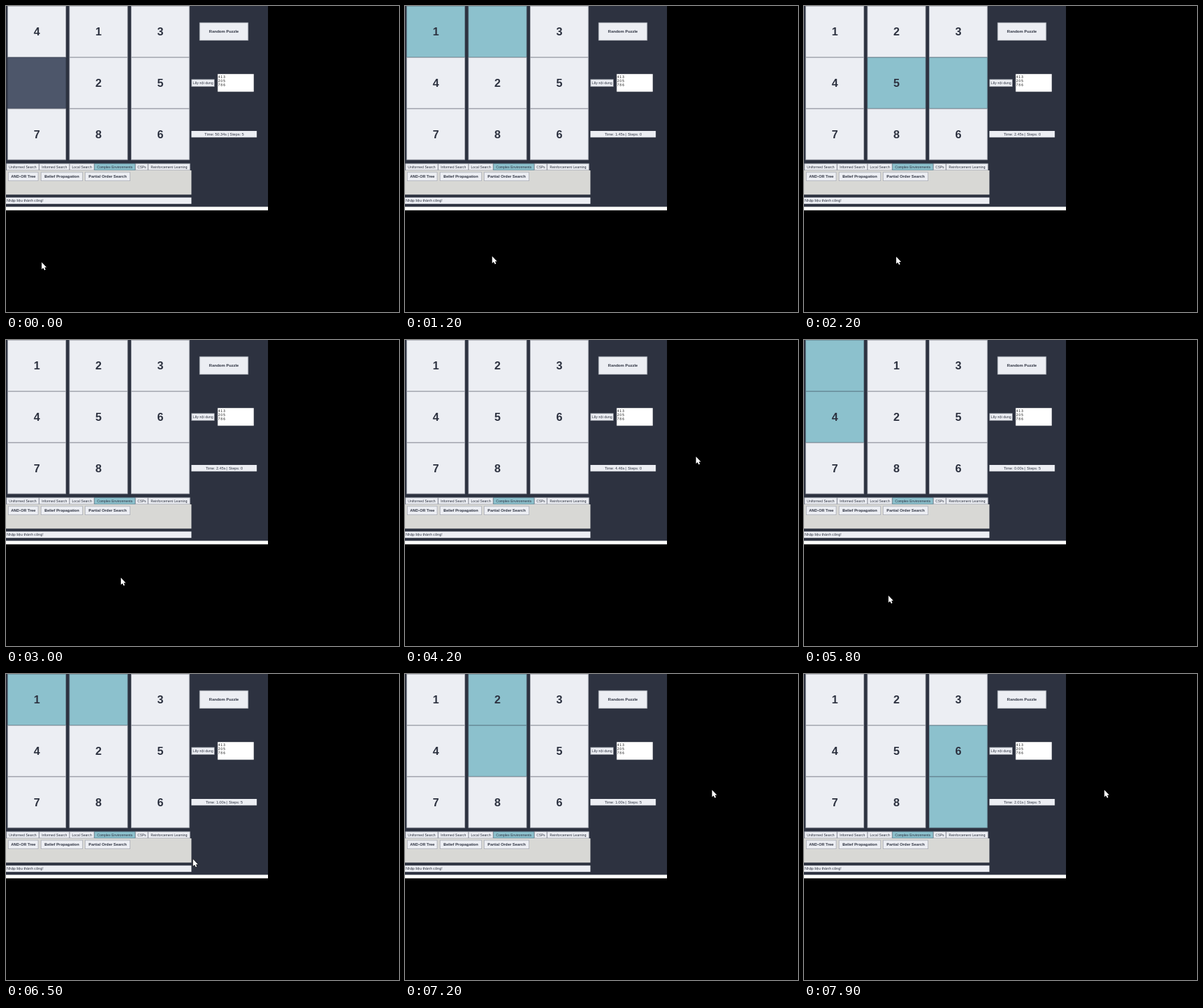
An HTML page with a canvas for the animation above (8 s loop, 588 by 458 pixels).

```html
<!DOCTYPE html>
<html lang="vi">
<head>
<meta charset="utf-8">
<style>
html, body { margin: 0; width: 100%; height: 100%; overflow: hidden; background: #000; }
canvas { display: block; }
</style>
</head>
<body>
<canvas id="stage" width="588" height="458"></canvas>
<script>
const ctx = document.getElementById('stage').getContext('2d');
const LOOP = 8000, STEP = 525, RESET = 4450, RESTART = 5275;
const INK = '#2d3240', LIGHT = '#eceef3', ACCENT = '#8cc1cd', EDGE = 'rgba(45, 50, 64, 0.35)';
const start = [4, 1, 3, 0, 2, 5, 7, 8, 6];
const blankPath = [3, 0, 1, 4, 5, 8];
const tabs = [
  ['Uniformed Search', 0.5, 49.5], ['Informed Search', 49.5, 95], ['Local Search', 95, 132],
  ['Complex Environments', 132, 193.5], ['CSPs', 193.5, 212.5], ['Reinforcement Learning', 212.5, 275.5]
];
// time, x, y of the pointer tip
const pointerKeys = [
  [0, 53, 383], [300, 53, 383], [1100, 130, 374], [1900, 130, 374], [2300, 139, 375],
  [2800, 139, 375], [3600, 345, 250], [4000, 435, 174], [4200, 435, 174], [4500, 296, 113],
  [4650, 296, 113], [5350, 126, 382], [6050, 126, 382], [6800, 362, 220], [7000, 474, 175],
  [7200, 459, 173], [7500, 449, 173], [LOOP, 449, 173]
];

function rect(x, y, w, h, color) {
  ctx.fillStyle = color;
  ctx.fillRect(x, y, w, h);
}

function text(str, x, y, size, { bold = false, align = 'center', color = INK } = {}) {
  ctx.font = `${bold ? 'bold ' : ''}${size}px "Liberation Sans", Arial, sans-serif`;
  ctx.textAlign = align;
  ctx.textBaseline = 'alphabetic';
  ctx.fillStyle = color;
  ctx.fillText(str, x, y + size * 0.35);
}

// Flat box with a soft edge inside its outline
function box(x, y, w, h, color) {
  rect(x, y, w, h, color);
  ctx.strokeStyle = EDGE;
  ctx.lineWidth = 0.8;
  ctx.strokeRect(x + 0.4, y + 0.4, w - 0.8, h - 0.8);
}

function button(label, x, y, w, h, size, bold = true) {
  box(x, y, w, h, LIGHT);
  text(label, x + w / 2, y + h / 2, size, { bold });
}

function boardAt(t) {
  const first = t < RESET ? 200 : 5800;
  const moves = Math.max(0, Math.min(5, Math.floor((t - first) / STEP) + 1));
  const cells = [...start];
  for (let i = 0; i < moves; i++) {
    cells[blankPath[i]] = cells[blankPath[i + 1]];
    cells[blankPath[i + 1]] = 0;
  }
  const active = moves && t < first + 5 * STEP ? [blankPath[moves - 1], blankPath[moves]] : [];
  return { cells, active, moves };
}

function drawBoard(t) {
  const { cells, active, moves } = boardAt(t);
  cells.forEach((value, i) => {
    const x = 2.3 + (i % 3) * 92.4, y = Math.floor(i / 3) * 76.8;
    const color = !value && !moves ? '#4d566a' : active.includes(i) ? ACCENT : LIGHT;
    box(x, y, 87.5, 76.8, color);
    if (value) text(value, x + 43.8, y + 38.2, 16.8, { bold: true });
  });
}

function statusAt(t) {
  if (t < 150) return 'Time: 50.34s | Steps: 5';
  const second = t >= RESTART;
  const ticks = Math.floor(second ? (t - RESTART) / 1005 : (t - 150) / 1000);
  const seconds = (second ? 0 : 0.447) + ticks * 1.0028;
  return `Time: ${seconds.toFixed(2)}s | Steps: ${second ? 5 : 0}`;
}

function drawControls(t) {
  button('Random Puzzle', 289.5, 24.7, 73, 27, 6);
  button('Lấy nội dung', 277.5, 109.7, 34.5, 11, 5.3, false);
  rect(316.7, 101.8, 54, 26.5, '#fff');
  ['4 1 3', '2 0 5', '7 8 6'].forEach((line, i) =>
    text(line, 317.5, 106 + i * 6, 4.6, { align: 'left', color: '#000' }));
  rect(277.4, 187, 97.8, 9.6, LIGHT);
  text(statusAt(t), 326.5, 191.8, 5.75);

  rect(0, 246, 277.4, 36.3, '#d8d8d5');
  tabs.forEach(([label, left, right], i) => {
    box(left, 235.7, right - left, 10.3, i === 3 ? ACCENT : LIGHT);
    text(label, (left + right) / 2, 240.8, 5.15);
  });
  button('AND-OR Tree', 3, 248.5, 45.5, 13.5, 5.8);
  button('Belief Propagation', 52, 248.5, 63, 13.5, 5.9);
  button('Partial Order Search', 118, 248.5, 68, 13.5, 5.9);

  rect(0, 286.6, 277.4, 9.6, LIGHT);
  text('Nhập liệu thành công!', 1, 291.5, 5.65, { align: 'left' });
}

function drawPointer(t) {
  const next = pointerKeys.findIndex(key => key[0] > t);
  const [t0, x0, y0] = pointerKeys[next - 1], [t1, x1, y1] = pointerKeys[next];
  const p = (t - t0) / (t1 - t0), k = p * p * (3 - 2 * p);
  ctx.save();
  ctx.translate(x0 + (x1 - x0) * k + 0.4, y0 + (y1 - y0) * k + 0.4);
  const arrow = new Path2D('M0 0V10.6L2.4 8.5L4.1 12L5.8 11.2L4.3 7.8H7.3Z');
  ctx.lineWidth = 1;
  ctx.strokeStyle = '#000';
  ctx.stroke(arrow);
  ctx.fillStyle = '#fff';
  ctx.fill(arrow);
  ctx.restore();
}

function frame() {
  const t = performance.now() % LOOP;
  rect(0, 0, 588, 458, '#000');
  rect(0, 0, 392, 301, INK);
  rect(0, 300.5, 392, 5.3, '#fdfdfb');
  drawBoard(t);
  drawControls(t);
  drawPointer(t);
  requestAnimationFrame(frame);
}
frame();
</script>
</body>
</html>
```
